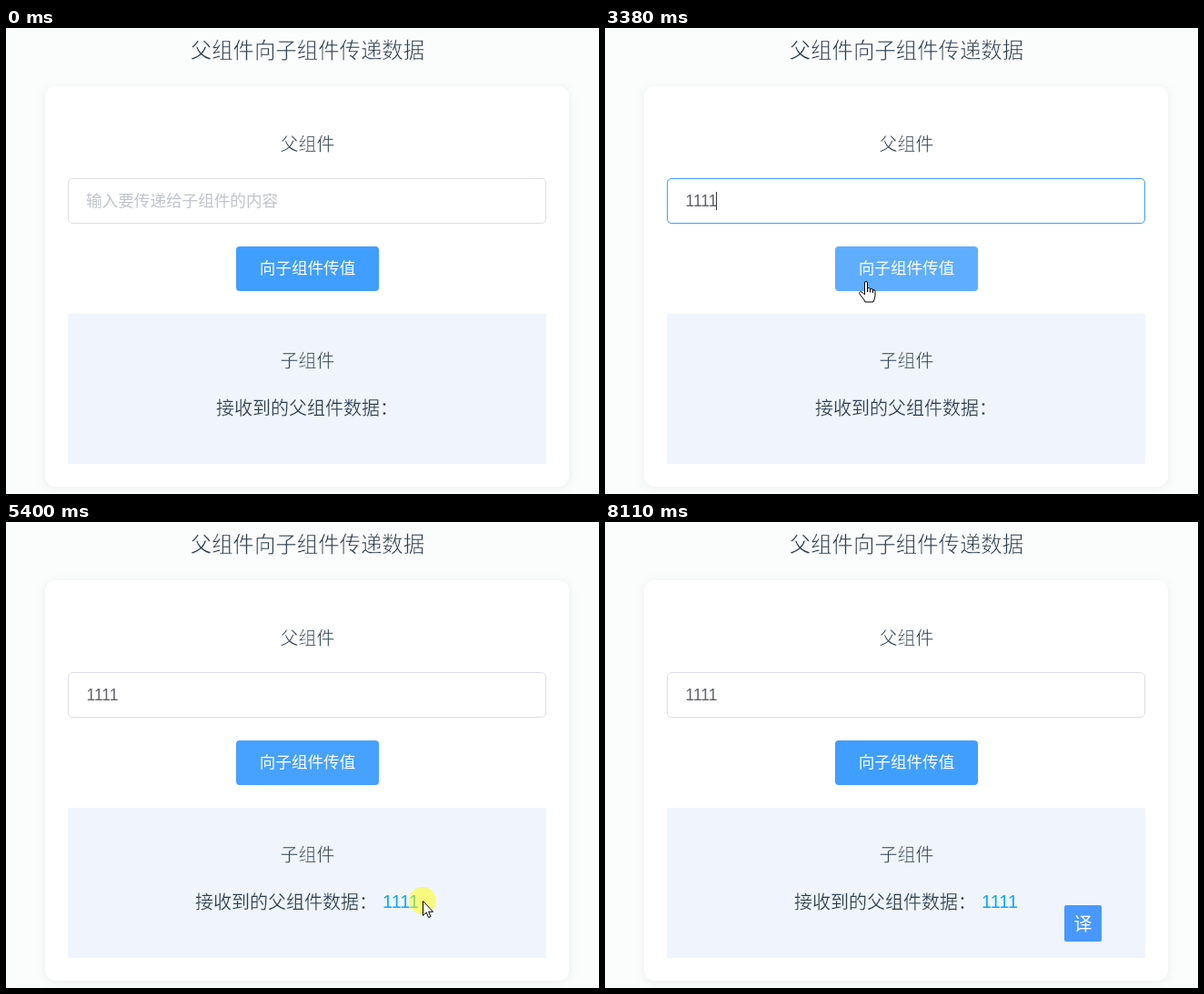
Write an HTML page that moves like this. It is 652 by 512 pixels and loops after 9050 ms.

```html
<!DOCTYPE html>
<html lang="zh-CN">
<head>
<meta charset="utf-8">
<style>
  html, body { margin: 0; width: 100%; height: 100%; overflow: hidden; background: #fbfdfc; }
  svg { display: block; width: 652px; height: 512px; font-family: "Noto Sans CJK SC", "Noto Sans CJK", sans-serif; }
  text { fill: #2c3e50; }
  .mid { text-anchor: middle; }
  /* A stroke in the background colour thins the letters to a light weight. */
  .light { font-weight: 300; stroke: #fdfefe; stroke-width: .55px; }
  .light.child { stroke: #f0f5fd; }
  .digits { font-family: "Liberation Sans", Arial, sans-serif; font-kerning: normal; }
  .white { fill: #fff; }
  #card { filter: drop-shadow(0 2px 6px rgba(0, 0, 0, .06)); }
  #beam { mix-blend-mode: difference; }
</style>
</head>
<body>
<svg viewBox="0 0 652 512">
  <defs>
    <clipPath id="selectionClip"><rect id="selectionBox" x="414" y="403" width="40" height="26"/></clipPath>
  </defs>
  <rect width="652" height="512" fill="#fbfdfc"/>
  <text class="mid light" x="331.5" y="33" font-size="23.4">父组件向子组件传递数据</text>
  <rect id="card" x="43" y="64" width="576" height="440" rx="12" fill="#fff"/>

  <text class="mid light" x="331.5" y="134.5" font-size="20">父组件</text>
  <rect id="field" x="68.5" y="165.5" width="525" height="49" rx="4.5" fill="#fff"/>
  <text id="placeholder" x="88" y="196" font-size="17.6" style="fill:#c0c4cc">输入要传递给子组件的内容</text>
  <text id="typed" class="digits" x="88.5" y="196" font-size="17.5" style="fill:#606266"></text>
  <rect id="caret" y="180" width="1" height="20" fill="#333"/>

  <rect id="button" x="253" y="240" width="157" height="49" rx="4"/>
  <text class="mid white" x="331.5" y="270" font-size="17.6">向子组件传值</text>

  <rect x="68" y="314" width="526" height="165" fill="#f0f5fd"/>
  <text class="mid light child" x="331.5" y="372.5" font-size="20">子组件</text>
  <text id="label" class="child" y="424.5" font-size="20" stroke="#f0f5fd" stroke-width=".25">接收到的父组件数据：</text>
  <text id="result" class="digits" x="414" y="424" font-size="20" style="fill:#11a8f7">1111</text>
  <g id="selection" clip-path="url(#selectionClip)">
    <rect x="414" y="403" width="40" height="26" fill="#3390ff"/>
    <text class="digits white" x="414" y="424" font-size="20">1111</text>
  </g>

  <g id="popup">
    <rect x="505" y="421" width="41" height="40" rx="2" fill="#4898ff"/>
    <text class="mid white" x="525.5" y="449" font-size="20">译</text>
  </g>

  <circle id="halo" r="15" fill="#ff0" opacity=".5"/>
  <path id="arrow" d="M.5 .5V16.5L4.2 13 6.7 18.5 9 17.5 6.6 12.2H11.5Z" fill="#fff" stroke="#000"/>
  <path id="hand" d="M-1.5 15V2Q-1.5 .5 0 .5T1.5 2V8Q4.5 6.5 4.5 9Q7.5 7.5 7.5 10Q10 9 10 11.5V16Q10 19 8 23H-1Q-2 20 -5 17L-7.5 13.5Q-7 10.5 -4 12.5ZM1.5 8V12M4.5 9V12.5M7.5 10V13" fill="#fff" stroke="#000" stroke-linejoin="round"/>
  <path id="beam" d="M-3 -8H-1L.5 -7 2 -8H4M.5 -7V8M-3 9H-1L.5 8 2 9H4" fill="none" stroke="#fff"/>
</svg>
<script>
const LOOP = 9050;
const el = {};
document.querySelectorAll('[id]').forEach(node => el[node.id] = node);

// Pointer moves: first step, last step, number of steps, destination.
const start = [574, 550];
const moves = [
  [110, 510, 6, 128, 183],
  [3220, 3380, 3, 287, 278],
  [3460, 3680, 4, 324, 272],
  [3860, 3860, 1, 324, 270],
  [4690, 5010, 5, 468, 423],
  [5090, 5170, 2, 458, 416],
  [5480, 5640, 3, 423, 416],
  [5790, 5790, 1, 420, 416],
  [6250, 6250, 1, 418, 416],
  [6400, 6400, 1, 415, 416],
  [6570, 6570, 1, 418, 416],
  [6630, 6950, 5, 505, 450],
  [7410, 7490, 2, 493, 408],
  [7730, 7970, 4, 641, 510],
];
const presses = [[980, 1060], [4080, 4160], [5400, 6570], [7570, 7650]];
const keys = [2290, 2750, 2930, 3070];

const GREY = [220, 223, 230], BLUE = [64, 158, 255], HOVER = [102, 177, 255], ACTIVE = [58, 142, 230];

const within = (t, [from, to]) => t >= from && t < to;
const show = (node, on) => node.setAttribute('visibility', on ? 'visible' : 'hidden');
const mix = (a, b, p) => a.map((v, i) => v + (b[i] - v) * p);
const rgb = color => `rgb(${color.map(Math.round)})`;

// Progress in equal jumps; the first jump happens at t0, the last at t1.
function ramp(t, t0, t1, steps) {
  if (t < t0) return 0;
  return Math.min(1, (Math.floor((t - t0) / (t1 - t0 || 1) * (steps - 1)) + 1) / steps);
}

function pointerAt(t) {
  return moves.reduce((pos, [t0, t1, steps, x, y]) => mix(pos, [x, y], ramp(t, t0, t1, steps)), start);
}

function cursorAt(t, x, y) {
  const inside = (l, top, r, b) => x >= l && x < r && y >= top && y < b;
  if (inside(253, 240, 410, 289) || t >= 7650 && inside(505, 421, 546, 461)) return 'hand';
  if (inside(68, 165, 594, 215) || t < 6950 && inside(208, 404, 455, 430)) return 'beam';
  return 'arrow';
}

function draw(t) {
  const [x, y] = pointerAt(t).map(Math.round);
  const visible = within(t, [110, 8110]);
  const cursor = cursorAt(t, x, y);
  for (const name of ['arrow', 'hand', 'beam', 'halo'])
    el[name].setAttribute('transform', `translate(${x} ${y})`);
  for (const name of ['arrow', 'hand', 'beam']) show(el[name], visible && name === cursor);
  show(el.halo, presses.some(span => within(t, span)));

  const count = keys.filter(k => t >= k).length;
  el.typed.textContent = '1'.repeat(count);
  show(el.placeholder, !count);
  el.caret.setAttribute('x', Math.floor(88.5 + 8.5 * count));
  show(el.caret, within(t, [980, 1510]) || within(t, [2050, 3600]));
  const focus = ramp(t, 980, 1130, 3) - ramp(t, 4080, 4230, 3);
  el.field.setAttribute('stroke', rgb(mix(GREY, BLUE, focus)));

  const hover = ramp(t, 3300, 3460, 3) ** .6 - ramp(t, 5400, 5480, 2) ** .25;
  const active = t < 4230 ? ramp(t, 4080, 4160, 2) : 0;
  el.button.setAttribute('fill', rgb(mix(mix(BLUE, HOVER, hover), ACTIVE, active)));

  const received = t >= 4230;
  el.label.setAttribute('x', received ? 208 : 231);
  show(el.result, received);

  const advance = 9.7;
  const edge = t < 6570 ? Math.min(454, 414 + advance * Math.round((x - 414) / advance)) : 414;
  el.selectionBox.setAttribute('x', edge);
  el.selectionBox.setAttribute('width', Math.max(0, 454 - edge));
  show(el.selection, within(t, [5400, 7570]));
  show(el.popup, t >= 7650);
}

const origin = performance.now();
function tick() {
  draw((performance.now() - origin) % LOOP);
  requestAnimationFrame(tick);
}
tick();
</script>
</body>
</html>
```
